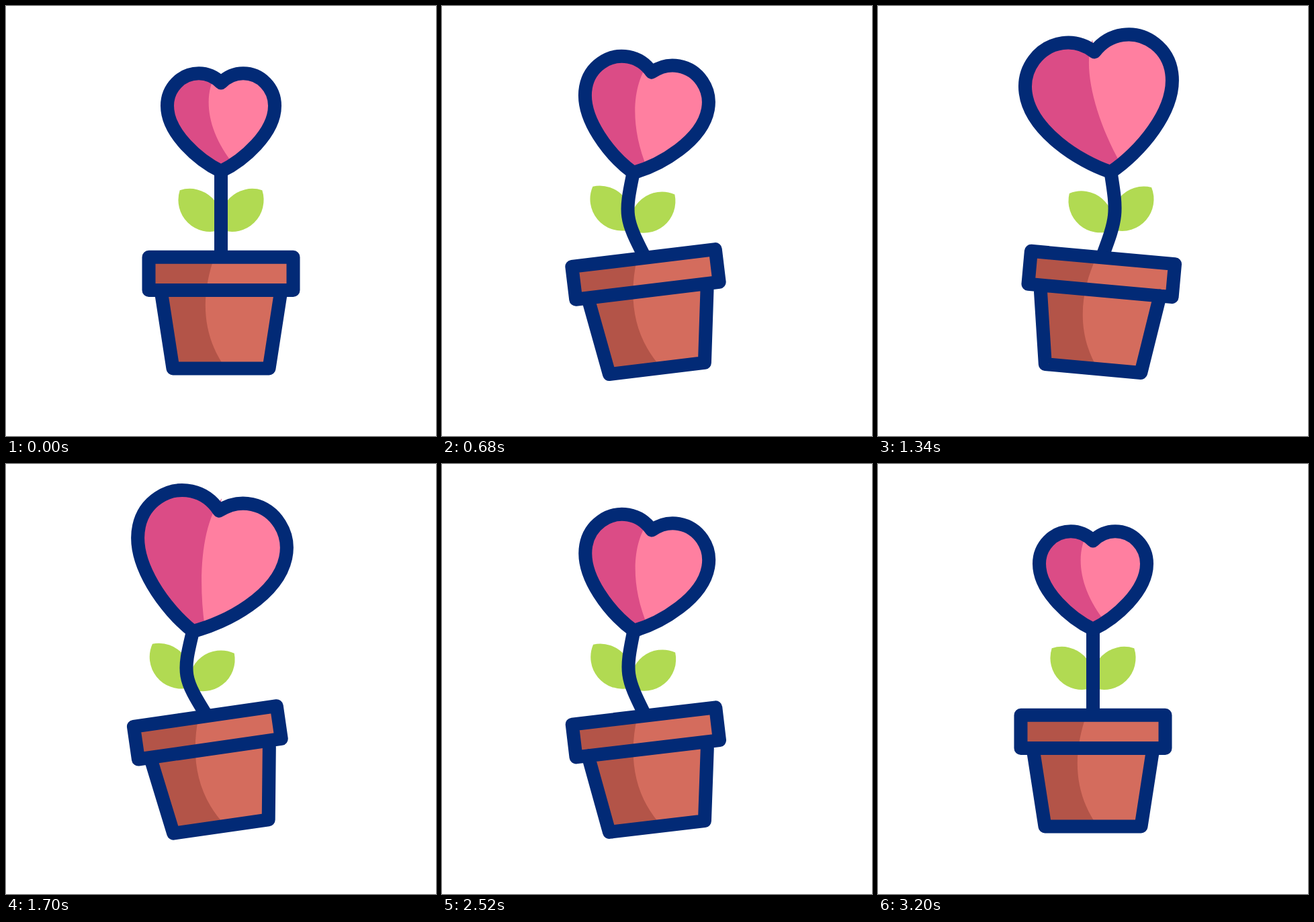
An HTML page that plays this animation: 640 by 640 pixels, repeating every 3.4 s.

```html
<!DOCTYPE html>
<html lang="en">
<head>
<meta charset="utf-8">
<title>Dancing heart flower</title>
<style>
  html, body { margin: 0; width: 100%; height: 100%; overflow: hidden; background: #fff; }
  svg { display: block; width: 100%; height: 100%; }
  .line { fill: none; stroke: #022a76; stroke-width: 20; stroke-linecap: round; stroke-linejoin: round; }
</style>
</head>
<body>
<svg viewBox="0 0 640 640">
  <g id="leaves" fill="#b1da52">
    <path id="leaf" d="M381.3 274.3A47.2 47.2 0 0 1 321.5 333.5A47.2 47.2 0 0 1 381.3 274.3Z"/>
    <use href="#leaf" transform="matrix(-1 0 0 1 640 0)"/>
  </g>
  <g id="plant">
    <path id="stem" class="line"/>
    <path fill="#d46c5d" d="M212.5 373.8H427.5V423H409.5L391.5 539.5H248.5L230.5 423H212.5Z"/>
    <path fill="#b35448" d="M310 374C292 425 288 485 327 539.5H248.5L230.5 423H212.5V374Z"/>
    <path class="line" d="M230.5 423L248.5 539.5H391.5L409.5 423M212.5 373.8H427.5V423H212.5Z"/>
    <g id="heart">
      <path id="full" fill="#ff7fa0"/>
      <path id="shade" fill="#db4c86"/>
      <path id="rim" class="line"/>
    </g>
  </g>
</svg>
<script>
  const $ = id => document.getElementById(id);
  const set = (id, name, value) => $(id).setAttribute(name, value);
  const smooth = x => x * x * (3 - 2 * x);

  const left = 'M320 114.5C311 105.5 300 100.3 287 100.3C261 100.3 240 122 240 148.5C240 189.5 287 230 320 246';
  const outline = left + 'C353 230 400 189.5 400 148.5C400 122 379 100.3 353 100.3C340 100.3 329 105.5 320 114.5Z';
  set('full', 'd', outline);
  set('rim', 'd', outline);

  const BEAT = 400, HALF = 1600, LOOP = 3400;

  // Lean from -1 (left) to 1 (right), swinging once per beat.
  function lean(p) {
    const beat = Math.floor(p / BEAT), e = smooth(p / BEAT - beat);
    if (!beat) return e;
    return beat % 2 ? 1 - 2 * e : 2 * e - 1;
  }

  function draw(now) {
    const t = now % LOOP;
    const p = Math.max(0, Math.min(t, 2 * HALF - t)); // forwards, then backwards, then rest
    const k = lean(p);
    const grow = smooth(p / HALF);
    const size = 1 + 0.4 * grow;
    const bend = 320 + 36 * k;

    set('plant', 'transform', `rotate(${12 * k} 320 540)`);
    set('stem', 'd', `M320 246C${bend} 307 ${bend} 312 ${320 - 4 * k} 374`);
    set('leaves', 'transform', `translate(${63 * k} ${0.8 * k * k}) rotate(${-9.7 * k} 320 290)`);
    set('heart', 'transform', `translate(320 246) rotate(${-30 * k}) scale(${size}) translate(-320 -246)`);
    // The shading edge straightens as the heart grows.
    set('shade', 'd', `${left}L${341 - 10 * grow} 238C${296 + 16 * grow} 185 ${294 + 11.5 * grow} 130 ${313 + 7 * grow} 101Z`);
    $('rim').style.strokeWidth = 20 / size;
  }

  const start = performance.now();
  function tick() {
    draw(performance.now() - start);
    requestAnimationFrame(tick);
  }
  tick();
</script>
</body>
</html>
```
